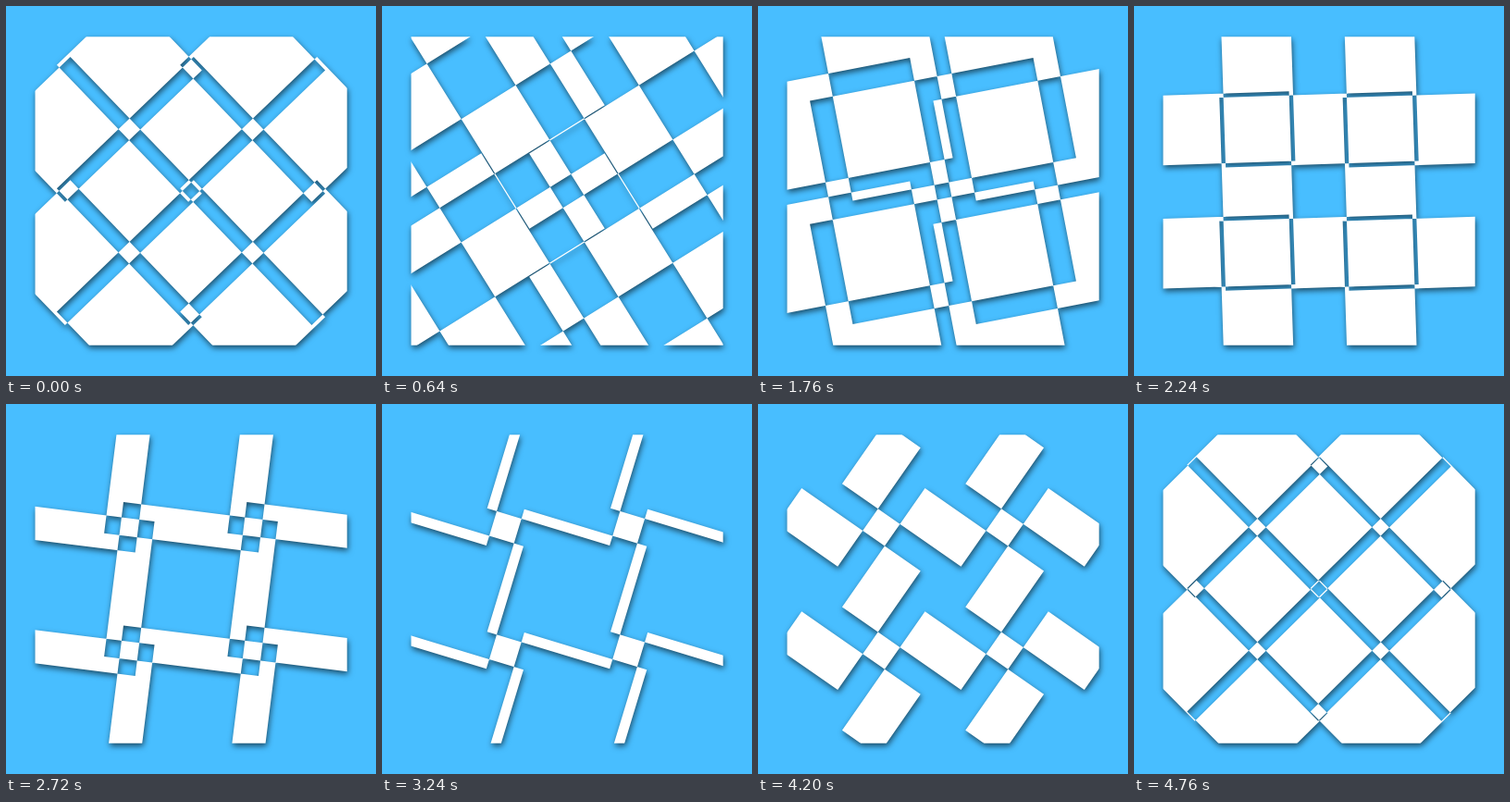
An HTML page with a canvas for the animation above (4.8 s loop, 400 px wide and 400 px high).

```html
<!DOCTYPE html>
<html lang="en">
<head>
<meta charset="utf-8">
<title>Turning squares</title>
<style>
  html, body { margin: 0; width: 100%; height: 100%; overflow: hidden; background: #48beff; }
  canvas { display: block; filter: drop-shadow(1.5px 3px 3px rgba(0, 0, 0, .6)); }
</style>
</head>
<body>
<canvas id="stage" width="400" height="400"></canvas>
<script>
const ctx = document.getElementById('stage').getContext('2d');
const LOOP = 4800, STEP = 40, PITCH = 400 / 3;

// Nine overlapping squares turn a quarter while their size swings;
// the even-odd rule against the window leaves the white pattern.
function draw(time) {
  const phase = ((Math.floor(time / STEP) + 1.5) * STEP % LOOP) / LOOP;
  const angle = (phase - 0.5) * Math.PI / 2;
  const size = 200 + PITCH / 2 * Math.sin(phase * 2 * Math.PI);
  const radius = size / Math.SQRT2;

  ctx.clearRect(0, 0, 400, 400);
  ctx.save();
  ctx.beginPath();
  ctx.rect(31.5, 33.3, 337.2, 333.4);
  ctx.clip();

  ctx.beginPath();
  ctx.rect(-400, -400, 1200, 1200);
  for (let row = -1; row <= 1; row++) {
    for (let col = -1; col <= 1; col++) {
      for (let corner = 0; corner < 4; corner++) {
        const a = angle + (corner + 0.5) * Math.PI / 2;
        const x = 200 + col * PITCH + radius * Math.cos(a);
        const y = 200 + row * PITCH + radius * Math.sin(a);
        corner ? ctx.lineTo(x, y) : ctx.moveTo(x, y);
      }
      ctx.closePath();
    }
  }
  ctx.fillStyle = '#fff';
  ctx.fill('evenodd');
  ctx.restore();
}

const start = performance.now();
function tick() {
  draw(performance.now() - start);
  requestAnimationFrame(tick);
}
tick();
</script>
</body>
</html>
```
